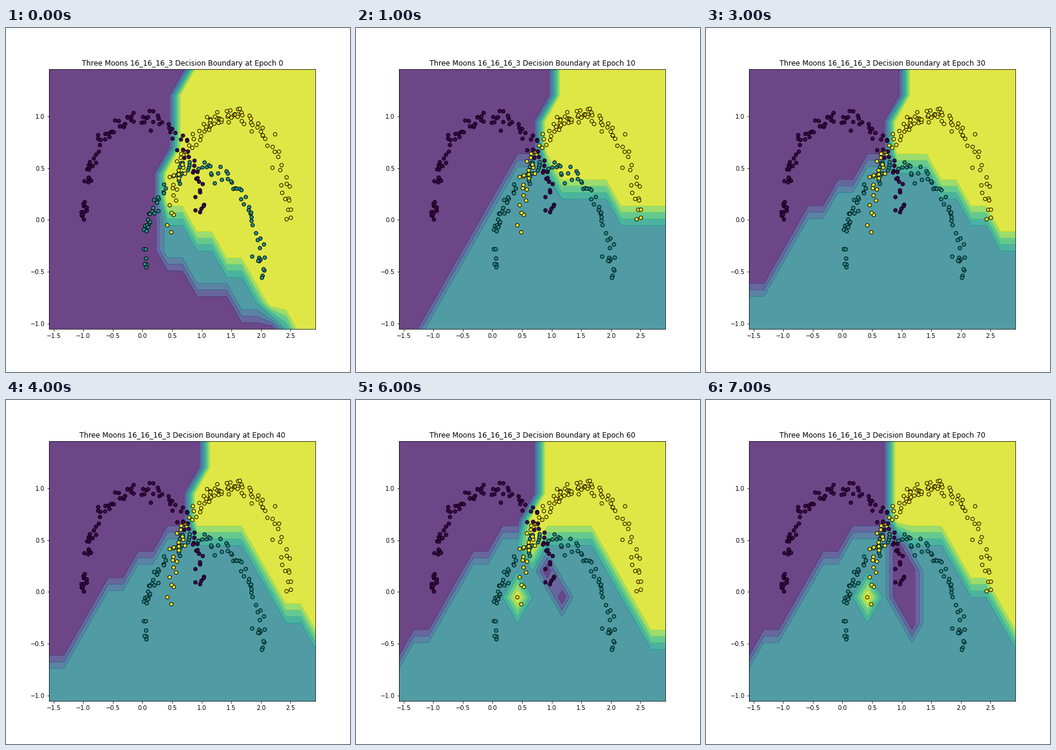
Write a matplotlib script that moves like this. It is 576 px wide and 576 px high and loops after 8000 ms.

```python
import numpy as np
import matplotlib.pyplot as plt
from matplotlib.animation import FuncAnimation

plt.rcParams["font.family"] = "DejaVu Sans"

PURPLE, TEAL, YELLOW = 0, 1, 2
STEP = 0.25
cols, rows = np.arange(19), np.arange(11)
xs = -1.5766 + STEP * cols
ys = -1.0492 + STEP * rows
C, R = np.meshgrid(cols, rows)
rng = np.random.default_rng(4)


def curve(at, keys):
    """Whole-cell values of the polyline through the key points."""
    return np.round(np.interp(at, *zip(*keys)))


def region(roof, wall, floor=None, gold=False, hole=None):
    """Teal lies under the roof; above it a wall parts purple from yellow."""
    z = np.where(C < curve(R, wall), PURPLE, YELLOW)
    z[R <= curve(C, roof)] = TEAL
    if floor:
        z[R < curve(C, floor)] = PURPLE
    if gold:
        z[4, 8] = YELLOW
    if hole is not None:
        # slanted pocket, `hole` cells tall to each side of its axis
        z[(C >= 10) & (C <= 11) & (abs(R + C - 15) <= hole)] = PURPLE
    return z


bend = [(8, 10), (9, 11)]
mid = [(0, 0.6), (4, 3.6), (8, 6)]
late = [(0, 0.95), (7, 6)]
slope = [(13, 5.75), (18, 1.8)]

regions = [
    region([(7, -1), (8, 4.35), (13, 1.6), (17, -0.7)],
           [(6, 8), (7, 9), (9, 9), (10, 10)], floor=[(8, 2.93), (16, 0.27)]),
    region([(1, -1), (8, 6), (10, 6), (11, 5), (14, 5), (15, 4)], bend),
    region([(0, 0), (8, 6), (12, 5.7), (18, 3.45)], bend),
    region(mid + [(12, 5.7), (18, 2.8)], bend),
    region(mid + slope, bend),
    region([(0, 0.95), (5, 4.56), (8, 5.8)] + slope, [(9, 10), (10, 11)]),
    region(late + [(8, 6), (9, 5), (10, 6), (13, 6), (17, 2)],
           [(7, 9), (8, 10)], gold=True, hole=0),
    region(late + [(13, 5.75), (18, 2.3)], [(0, 10)], gold=True, hole=1),
]


def moon(cx, cy, clumps):
    """Noisy unit half circle; clumps are (from angle, to angle, count)."""
    angle = np.radians(np.concatenate([np.linspace(*c) for c in clumps]))
    angle += rng.normal(0, 0.02, angle.size)
    radius = 1 + rng.normal(0, 0.045, angle.size)
    return cx + radius * np.cos(angle), cy + radius * np.sin(angle)


moons = [
    moon(1, -0.5, [(178, 167, 6), (158, 144, 14), (142, 126, 9), (116, 100, 12),
                   (92, 70, 12), (67, 42, 13), (38, 29, 7), (20, -3, 15)]),
    moon(1.5, 0, [(185, 159, 9), (161, 143, 15), (141, 122, 11), (117, 99, 20),
                  (95, 77, 17), (73, 53, 12), (50, 29, 9), (25, 0, 12)]),
    moon(0, 0, [(180, 170, 13), (160, 143, 16), (137, 120, 12), (115, 98, 13),
                (92, 72, 13), (66, 56, 6), (51, 38, 9), (33, 3, 17)]),
]
px, py = np.hstack(moons)
kinds = np.repeat([TEAL, YELLOW, PURPLE], [len(m[0]) for m in moons])

fig = plt.figure(figsize=(8, 8), dpi=72, facecolor="white")
ax = fig.add_axes([0.125, 0.125, 0.775, 0.755])


def draw(i):
    ax.clear()
    ax.contourf(xs, ys, regions[i], levels=np.arange(0, 2.01, 0.25),
                cmap="viridis", alpha=0.8)
    ax.scatter(px, py, c=kinds, s=36, cmap="viridis", edgecolors="black",
               linewidths=1)
    ax.set_xlim(xs[0], xs[-1])
    ax.set_ylim(ys[0], ys[-1])
    ax.set_xticks(np.arange(-1.5, 2.6, 0.5))
    ax.set_yticks(np.arange(-1, 1.1, 0.5))
    ax.set_title(f"Three Moons 16_16_16_3 Decision Boundary at Epoch {10 * i}")
    return []


anim = FuncAnimation(fig, draw, frames=len(regions), init_func=lambda: [],
                     interval=1000, repeat=True, repeat_delay=0)
plt.show()
```
